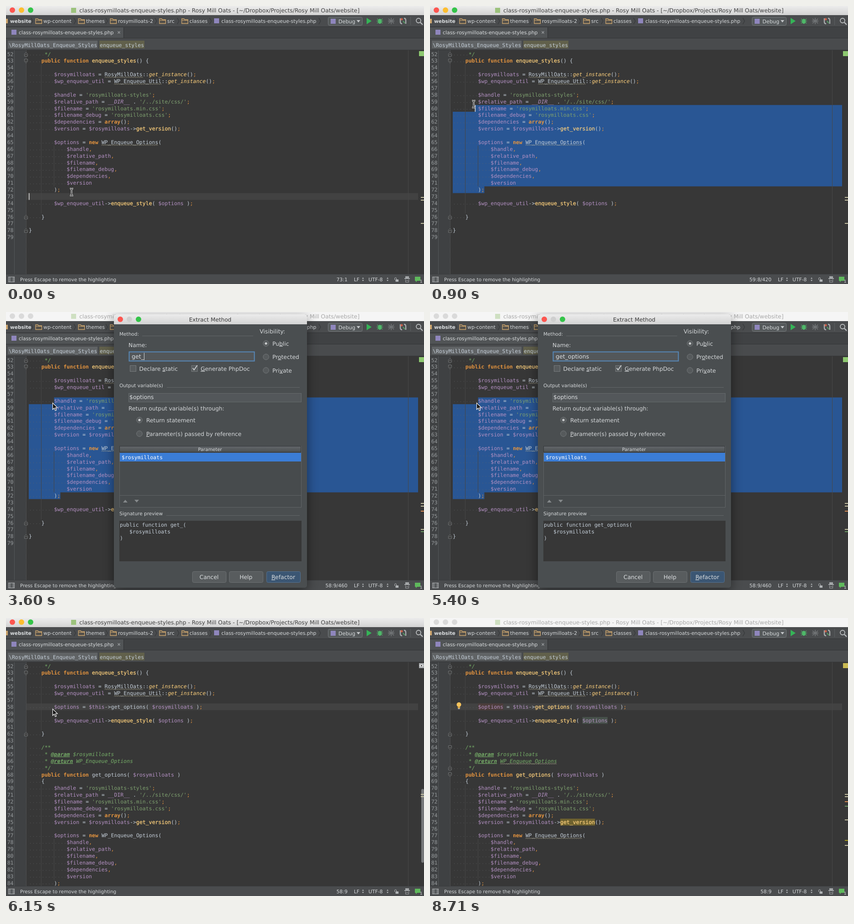
Recreate the animation shown at these times as an HTML page. Size 918 px wide and 610 px high, loop 8.81 s.

```html
<!DOCTYPE html>
<html lang="en">
<head>
<meta charset="utf-8">
<title>Extract Method</title>
<style>
html, body { margin: 0; width: 100%; height: 100%; overflow: hidden; background: #373737; }
svg { position: absolute; left: 0; top: 0; display: block; }
text { font-family: "DejaVu Sans", sans-serif; white-space: pre; text-rendering: geometricPrecision; }
.mono, .mono text { font: 11.53px "DejaVu Sans Mono", monospace; fill: #c3cdd7; }
.mono .key { fill: #e4943f; font-weight: bold; }
.mono .punct { fill: #e4943f; }
.mono .var { fill: #b491c3; }
.mono .str { fill: #7ea06f; }
.mono .fn, .mono .lateFn { fill: #ffd17d; stroke: #ffd17d; stroke-width: .25; }
.mono .static { fill: #ffd17d; font-style: italic; }
.mono .const { fill: #b491c3; font-style: italic; }
.mono .doc { fill: #76ae68; font-style: italic; }
.mono .tag { fill: #76ae68; font-style: italic; font-weight: bold; text-decoration: underline; }
.mono .num { fill: #979b9d; text-anchor: end; }
.mono.fresh .lateFn { fill: #c3cdd7; stroke: none; }
.mono.fresh .const { font-style: normal; }
</style>
</head>
<body>
<svg id="stage" width="918" height="610" viewBox="0 0 918 610"></svg>
<script>
const LOOP = 8810, LEFT = 50, CHAR = 6.941, PITCH = 14.875, FIRST = 52;
const colX = col => LEFT + col * CHAR;
const rowY = line => 98.2 + (line - FIRST) * PITCH;

// Markup helpers
const rect = (x, y, w, h, fill, more = '') =>
  `<rect x="${x}" y="${y}" width="${w}" height="${h}" fill="${fill}" ${more}/>`;
const dot = (x, y, r, fill, more = '') => `<circle cx="${x}" cy="${y}" r="${r}" fill="${fill}" ${more}/>`;
const path = (d, stroke, more = '') => `<path d="${d}" stroke="${stroke}" fill="none" ${more}/>`;
const shape = (d, fill, more = '') => `<path d="${d}" fill="${fill}" ${more}/>`;
const label = (x, y, str, size, fill = '#d5d8da', more = '') =>
  `<text x="${x}" y="${y}" font-size="${size}" fill="${fill}" ${more}>` +
  str.replace(/&(.)/, '<tspan text-decoration="underline">$1</tspan>') + '</text>';
const group = (id, body, more = '') => `<g id="${id}" ${more}>${body}</g>`;
const lights = (y, x, colors) => colors.map((c, i) => dot(x + i * 20, y, 6, c)).join('');

// Source code shown in the editor
const head = [
  '     */', '    public function enqueue_styles() {', '',
  '        $rosymilloats = RosyMillOats::get_instance();',
  '        $wp_enqueue_util = WP_Enqueue_Util::get_instance();', ''];
const body = [
  "        $handle = 'rosymilloats-styles';",
  "        $relative_path = __DIR__ . '/../site/css/';",
  "        $filename = 'rosymilloats.min.css';",
  "        $filename_debug = 'rosymilloats.css';",
  '        $dependencies = array();',
  '        $version = $rosymilloats->get_version();', '',
  '        $options = new WP_Enqueue_Options(',
  ...['$handle,', '$relative_path,', '$filename,', '$filename_debug,', '$dependencies,', '$version']
    .map(arg => ' '.repeat(12) + arg),
  '        );'];
const tail = ['        $wp_enqueue_util->enqueue_style( $options );', '', '    }', ''];
const before = [...head, ...body, '', ...tail, '}', ''];
const after = [...head, '        $options = $this->get_options( $rosymilloats );', '', ...tail,
  '    /**', '     * @param $rosymilloats', '     * @return WP_Enqueue_Options', '     */',
  '    public function get_options( $rosymilloats )', '    {', ...body];

const rules = [
  ['str', /^'[^']*'/], ['var', /^\$\w+/], ['const', /^__DIR__/],
  ['key', /^(public|function|new|array)\b/], ['static', /^get_instance/],
  ['lateFn', /^get_options/], ['fn', /^(enqueue_styles?|get_version)/],
  ['punct', /^[;,]/], ['', /^(\w+|\s+|[^\w\s$';,]+)/]];

function tokens(line) {
  if (/^\s*(\/\*|\*)/.test(line))
    return line.split(/(@\w+)/).map(s => [s[0] === '@' ? 'tag' : 'doc', s]);
  const out = [];
  while (line) {
    const [cls, re] = rules.find(([, r]) => r.test(line));
    const text = line.match(re)[0];
    out.push([cls, text]);
    line = line.slice(text.length);
  }
  return out;
}

function codeLine(line, n) {
  const y = rowY(n) + 11.4, indent = line.search(/\S/);
  let col = 0, spans = '', dots = '';
  for (const [cls, text] of tokens(line)) {
    const pad = text.search(/\S/);
    if (pad >= 0) spans += `<tspan class="${cls}" x="${colX(col + pad)}">${text.slice(pad)}</tspan>`;
    col += text.length;
  }
  for (let i = 0; i < indent; i++) dots += `M${colX(i + .5) - .5} ${y - 2}h1`;
  return (dots && path(dots, '#636567')) + `<text y="${y}">${spans}</text>`;
}
const code = lines => lines.map((s, i) => codeLine(s, FIRST + i)).join('');

function wave(line, col, count) {
  const n = Math.round(count * CHAR / 4);
  return path(`M${colX(col)} ${rowY(line) + 14.4}` + 'l2 -1.8l2 1.8'.repeat(n), '#b3ae94', 'stroke-width=".8"');
}
const guide = (col, from, to) => path(`M${Math.floor(colX(col)) + .5} ${rowY(from)}V${rowY(to)}`, '#464646');
const usage = (lines, line, word, fill) => {
  const col = lines[line - FIRST].lastIndexOf(word);
  return rect(colX(col), rowY(line), word.length * CHAR, 15, fill);
};
const fold = (line, down) => {
  const y = rowY(line) + 3.5;
  const d = down ? `M40.5 ${y}h7v5l-3.5 3.5l-3.5-3.5z` : `M40.5 ${y + 8.5}h7v-5l-3.5-3.5l-3.5 3.5z`;
  return shape(d, '#373737', 'stroke="#7c7f80" stroke-width=".9"') + path(`M42.3 ${y + 4.5}h3.4`, '#8f9293');
};
const mark = (y, color = '#c4c0a0') => rect(911, y - 1, 7, 2, color);
const numbers = (from, to) => {
  let s = '';
  for (let n = from; n <= to; n++) s += `<text class="num" x="16.5" y="${rowY(n) + 11.4}">${n}</text>`;
  return s;
};

// Window chrome
const folder = x => shape(`M${x} 28h5l1.5 2h7v8.5h-13.5z`, '#54504a', 'stroke="#cda66f" stroke-width="1.3"') +
  path(`M${x} 31.5h13.5`, '#cda66f');
const chevron = x => path(`M${x} 26l4 7l-4 7`, '#36383a', 'stroke-width="1.2"');
const chip = (x, y, color = '#8f86bd') => rect(x, y, 11, 11, color);

const fileName = 'class-rosymilloats-enqueue-styles.php';
const titleText = fileName + ' - Rosy Mill Oats - [~/Dropbox/Projects/Rosy Mill Oats/website]';
const titleBar = (id, bar, text, colors, icon) => group(id,
  rect(0, 0, 918, 20, bar) + lights(9, 14, colors) + chip(143, 4, icon) + label(161, 14, titleText, 12.28, text));

const crumbs = [[82, 'wp-content'], [176, 'themes'], [246, 'rosymilloats-2'], [354, 'src'], [403, 'classes']];
const toolbar = rect(0, 20, 918, 26, '#4a4c4e') + rect(0, 45, 918, 1, '#333537') +
  rect(0, 28, 4, 10, '#cda66f') + label(9, 37, 'website', 10.6, '#dadddf', 'font-weight="bold"') +
  crumbs.map(([x, s]) => chevron(x - 27) + folder(x - 17) + label(x, 37, s, 10.95)).join('') +
  chevron(447) + chip(457, 27) + label(473, 37, fileName, 10.9) + chevron(687) +
  rect(707.5, 24.5, 75, 18, '#55595b', 'rx="3" stroke="#75797b"') + chip(713, 28) +
  label(730, 38, 'Debug', 11.3) + shape('M770 31h8l-4 5z', '#c6c9cb') +
  shape('M792 26l11 7l-11 7z', '#35b457') +
  path('M815 28l12 10M815 38l12-10M814 33h14', '#4fa864', 'stroke-width="1.4"') +
  '<ellipse cx="821" cy="33.5" rx="4" ry="5.5" fill="#4fb869"/>' +
  path('M840 28l12 10M840 38l12-10M846 26v14M839 33h14', '#6f7274', 'stroke-width="1.8"') +
  path('M866 27v8q0 4 4 4M874 27q4 0 4 4v8', '#a9acae', 'stroke-width="2.4"') +
  dot(869, 29, 2.5, '#c9624c') + path('M872 33l4 5', '#58a866', 'stroke-width="2"') +
  path('M888.5 24v18', '#5c5f61') +
  dot(906, 32, 5, 'none', 'stroke="#b9bcbe" stroke-width="1.8"') + path('M910 36l5 5', '#b9bcbe', 'stroke-width="2.4"');

const tabs = rect(0, 46, 918, 25, '#404244') + rect(0, 47, 258, 23, '#515456') + rect(258, 47, 1, 23, '#2f3133') +
  chip(12, 52) + label(28, 62, fileName, 10.9, '#dadddf') +
  path('M245.5 55.5l5 5m0-5l-5 5', '#9b9ea0', 'stroke-width="1.2"') + rect(0, 70, 918, 1, '#333537') +
  rect(0, 71, 918, 26, '#494b4d') + rect(4, 76, 197, 17, '#606365') + rect(205, 76, 99, 17, '#61604b') +
  '<g class="mono"><text x="6" y="90">\\RosyMillOats_Enqueue_Styles</text><text x="206" y="90">enqueue_styles</text></g>' +
  rect(0, 96, 918, 1, '#353739');

const updown = x => shape(`M${x} 598.5l2-3l2 3zM${x} 601l2 3l2-3z`, '#b6b9bb');
const statusBar = rect(0, 588, 918, 22, '#4a4c4e') + rect(0, 588, 918, 1, '#3a3c3e') +
  rect(5.5, 594.5, 13, 11, '#585b5d', 'stroke="#b0b3b5"') + path('M8.5 594v12M16 594v12', '#b0b3b5') +
  label(31, 604, 'Press Escape to remove the highlighting', 10.48) +
  label(750, 604, '', 10.8, '#d5d8da', 'id="position" text-anchor="end"') +
  label(764, 604, 'LF', 10.8) + updown(782) + label(796, 604, 'UTF-8', 10.8) + updown(836) +
  rect(855.5, 600, 6.5, 5, '#b0b3b5') + path('M853.5 601v-3q0-2 2-2t2 2v2', '#b0b3b5') +
  rect(877, 593, 8, 4, '#a4a7a9') + rect(875, 597, 12, 2, '#a4a7a9') +
  path('M877.5 600v6h7v-6M879 602.5h4', '#a4a7a9') +
  shape('M898 594h12v9h-7l-3 3v-3h-2z', '#5fb95c') + label(909, 607, '1', 8.5, '#e0e2e3');

// Extract Method dialog
const radio = (x, y, s, on, gap = 14) => dot(x, y, 6.3, '#565a5c', 'stroke="#74787a"') +
  (on ? dot(x, y, 2.6, '#c9cccd') : '') + label(x + gap, y + 4.5, s, 12.3);
const check = (x, y, s, on) => rect(x + .5, y + .5, 13, 13, '#575b5d', 'stroke="#777b7d"') +
  (on ? path(`M${x + 3} ${y + 6}l3 4l7-10`, '#d0d3d4', 'stroke-width="1.8"') : '') + label(x + 20.5, y + 11.5, s, 12.3);
const section = (x, y, s, from, to) => label(x, y, s, 10.5) + path(`M${from} ${y + .5}H${to}`, '#626668');
const button = (x, w, s, fill = '#585c5e', edge = '#6d7173') =>
  rect(x + .5, 569.5, w, 24, fill, `rx="3" stroke="${edge}"`) +
  label(x + w / 2, 586, s, 12.4, '#dcdfe1', 'text-anchor="middle"');

const dialog =
  rect(237, 12, 424, 600, '#000', 'opacity=".45" filter="url(#blur)"') +
  rect(237, 5, 424, 600, '#4a4e50', 'rx="5"') +
  shape('M237 27V10q0-5 5-5h414q5 0 5 5v17z', 'url(#bar)') +
  lights(16, 251, ['#fc5650', '#cfcfcf', '#34c449']) +
  label(448.5, 21, 'Extract Method', 12.2, '#3a3a3a', 'text-anchor="middle"') +
  section(249, 52, 'Method:', 299, 543) + label(557, 47, 'Visibility:', 12.6) +
  radio(571, 69, 'Pu&blic', true) + radio(571, 98.5, 'Pr&otected') + radio(571, 128, 'Pri&vate') +
  label(269, 77, 'Name:', 12.3) +
  rect(270.5, 87.5, 275, 20, '#53575a', 'stroke="#5788b8" stroke-width="2"') +
  label(276, 102, '', 12.6, '#dcdfe1', 'id="name"') + rect(0, 89.5, 1, 16, '#d5d8da', 'id="nameCaret"') +
  check(272, 117, 'Declare &static') + check(407, 117, '&Generate PhpDoc', true) +
  section(249, 165, 'Output variable(s)', 353, 645) +
  rect(269.5, 178.5, 379, 19, '#53575a', 'stroke="#656a6c"') + label(271, 191, '$options', 12.4, '#dcdfe1') +
  label(269, 216, 'Return output variable(s) through:', 12.25) +
  radio(293, 237, 'Return statement', true, 15) + radio(293, 267, '&Parameter(s) passed by reference', false, 15) +
  rect(249.5, 294.5, 399, 134, '#474b4d', 'stroke="#5f6365"') +
  rect(249.5, 294.5, 398, 13, 'url(#header)', 'stroke="#34373a"') +
  label(448, 305, 'Parameter', 10.1, '#d8dbdd', 'text-anchor="middle"') +
  rect(250, 309, 398, 19, '#3b7dd6') + '<text class="mono" x="254" y="323" style="fill:#fff">$rosymilloats</text>' +
  rect(250, 402, 398, 1, '#5f6365') + shape('M257 418l5-6l5 6zM282 412l5 6l5-6z', '#85898b') +
  section(249, 446, 'Signature preview', 352, 645) + rect(249, 458, 400, 89, '#373737') +
  '<g class="mono"><text id="preview" x="250" y="471"></text><text x="271" y="486">$rosymilloats</text><text x="250" y="500">)</text></g>' +
  button(409, 74, 'Cancel') + button(490, 74, 'Help') + button(572, 74, '&Refactor', '#3b5673', '#54718f');

const bulb = dot(63.5, 190, 5, '#f6c35c') + rect(61, 194, 5, 4, '#d9a646') + rect(61.5, 198, 4, 2, '#b5b5b5');

document.getElementById('stage').innerHTML = `
  <defs>
    <linearGradient id="bar" x2="0" y2="1"><stop stop-color="#ececec"/><stop offset="1" stop-color="#d3d3d3"/></linearGradient>
    <linearGradient id="header" x2="0" y2="1"><stop stop-color="#62666a"/><stop offset="1" stop-color="#4c5052"/></linearGradient>
    <filter id="blur" x="-20%" y="-20%" width="140%" height="140%"><feGaussianBlur stdDeviation="12"/></filter>
  </defs>` +
  rect(0, 97, 918, 492, '#373737') + rect(0, 97, 44, 492, '#3f4143') + rect(18, 97, 1, 492, '#54575a') +
  path('M44.5 97V589', '#626466', 'stroke-dasharray="1 1"') +
  rect(LEFT - 5, 0, 860, PITCH, '#424242', 'id="caretRow"') +
  '<path id="selection" fill="#295694"/>' + path('M883.5 97V589', '#474747') +
  group('usages', usage(after, 58, '$options', '#4c3d3b') + usage(after, 60, '$options', '#47514b') +
    usage(after, 75, 'get_version', '#6f622f')) +
  group('numbers', numbers(52, 79) + group('moreNumbers', numbers(80, 84)), 'class="mono"') +
  fold(52) + fold(53, true) + wave(55, 24, 12) + wave(56, 27, 15) +
  group('codeBefore', guide(4, 54, 76) + guide(8, 66, 72) + code(before) + wave(65, 23, 18) + fold(76) + fold(78), 'class="mono"') +
  group('codeAfter', guide(4, 54, 62) + guide(4, 70, 85) + guide(8, 78, 84) + code(after) + fold(62), 'class="mono"') +
  group('analysed', wave(66, 15, 18) + wave(77, 23, 18) + fold(64, true) + fold(67) + fold(68, true)) +
  group('bulb', bulb) +
  rect(907, 99, 11, 11, '#8dc86f', 'id="health"') +
  group('eye', rect(907, 99, 11, 11, '#a9acae') + '<ellipse cx="912.5" cy="104.5" rx="4" ry="2.8" fill="#e8e8e8"/>' + dot(912.5, 104.5, 1.6, '#444')) +
  group('marksBefore', mark(420) + mark(426) + mark(477)) +
  group('marksUsage', mark(437, '#d98c55') + mark(482, '#6b9a63')) +
  rect(912, 375, 6, 162, '#76787a', 'id="scroll" rx="3"') +
  group('marksNew', mark(387) + mark(392)) +
  group('marksAfter', mark(403, '#d98c55') + mark(413, '#6b9a63') + mark(443) + mark(488, '#a89d1c') + mark(499)) +
  rect(0, 0, 1.5, PITCH, '#e0e0e0', 'id="caret"') +
  titleBar('active', 'url(#bar)', '#414141', ['#fc5650', '#fdbe30', '#34c449'], '#9cc27c') +
  titleBar('inactive', '#f5f5f5', '#a9a9a9', ['#dadada', '#dadada', '#dadada'], '#cfe0c2') +
  toolbar + tabs + statusBar +
  group('ibeam', ['#fff', '#111'].map((c, i) =>
    path('M-3.5-7.5q3.5 0 3.5 3V5q0 3-3.5 3M3.5-7.5q-3.5 0-3.5 3M3.5 8q-3.5 0-3.5-3M-2 3h4', c, `stroke-width="${3 - 1.8 * i}"`)).join('')) +
  group('arrow', shape('M0 0V14.5L3.4 11.3L5.8 17L8.2 16L5.8 10.5H10.5Z', '#111', 'stroke="#fff" stroke-width="1.1"')) +
  group('dialog', dialog);

// Timelines: the last entry whose time has passed applies
const pointer = [
  [0, 'ibeam', 144, 408], [300, 'ibeam', 122, 405], [450, 'ibeam', 119, 390], [600, 'ibeam', 112, 345],
  [750, 'ibeam', 102, 272], [900, 'ibeam', 96, 215], [1050, 'ibeam', 97, 203], [1200, 'ibeam', 100, 195],
  [1500, 'ibeam', 106, 198], [1650, 'arrow', 102.5, 199.5], [7500, 'ibeam', 110, 195],
  [7800, 'ibeam', 190, 238], [7950, 'ibeam', 520, 408], [8100, 'ibeam', 892, 581], [8250, 'none', 0, 0]];
// time, drawn line and column, reported line
const carets = [
  [0, 73, 0, 73], [300, 72, 10, 72], [450, 71, 10, 71], [600, 68, 9, 67], [750, 63, 8, 62],
  [900, 60, 7, 59], [1050, 59, 7, 58], [1200, 58, 7, 58], [1500, 58, 8, 58]];
// time, letters of the name
const typed = [
  [0, 0], [3150, 2], [3300, 3], [3600, 4], [3750, 5], [3900, 6], [4050, 7],
  [4350, 8], [4500, 9], [4650, 10], [4950, 11]];
const END = { line: 72, col: 10 };

const at = (track, t) => track.filter(step => step[0] <= t).pop();
const $ = id => document.getElementById(id);
const show = (id, on) => { $(id).style.display = on ? '' : 'none'; };
const set = (id, text) => { if ($(id).textContent !== text) $(id).textContent = text; };

function selectedCount(line, col) {
  if (line === END.line) return END.col - col;
  const rows = before.slice(line - FIRST, END.line - FIRST);
  return rows.reduce((sum, s) => sum + s.length + 1, 0) - col + END.col;
}

function selectionPath(line, col) {
  const top = rowY(line), last = rowY(END.line);
  return `M${colX(col)} ${top}H905V${last}H${colX(END.col)}V${last + PITCH}H${LEFT}V${top + PITCH}H${colX(col)}z`;
}

function draw(t) {
  const extracted = t >= 6150, open = t >= 2550 && t < 6000, done = t >= 6600;
  const [, line, col, reported] = at(carets, t);
  const selecting = t >= 450 && !extracted;
  const inactive = open || t >= 8710;

  show('active', !inactive);
  show('inactive', inactive);
  show('codeBefore', !extracted);
  show('codeAfter', extracted);
  show('moreNumbers', extracted);
  $('codeAfter').classList.toggle('fresh', t < 6300);

  show('caretRow', !selecting);
  $('caretRow').setAttribute('y', rowY(line));
  show('selection', selecting);
  if (selecting) $('selection').setAttribute('d', selectionPath(line, col));
  show('caret', !extracted && !open);
  $('caret').setAttribute('x', colX(col));
  $('caret').setAttribute('y', rowY(line));
  set('position', `${reported}:${col + 1}` + (selecting ? '/' + selectedCount(reported, col) : ''));

  show('marksBefore', !extracted);
  show('marksUsage', t >= 2400 && !extracted);
  show('marksNew', extracted);
  show('marksAfter', done);
  show('analysed', done);
  show('usages', t >= 6900);
  show('bulb', t >= 7050);
  show('eye', extracted && !done);
  $('health').setAttribute('fill', done ? '#c9b952' : '#8dc86f');
  show('scroll', extracted && t < 7350);
  $('scroll').style.opacity = Math.min(1, Math.max(0, (7350 - t) / 600));

  const [, kind, x, y] = at(pointer, t);
  for (const id of ['ibeam', 'arrow']) show(id, id === kind);
  if (kind !== 'none') $(kind).setAttribute('transform', `translate(${x} ${y})`);

  show('dialog', open);
  if (open) {
    const name = 'get_options'.slice(0, at(typed, t)[1]);
    set('name', name);
    set('preview', `public function ${name}(`);
    show('nameCaret', t >= 2700 && t < 5400);
    $('nameCaret').setAttribute('x', 276 + (name ? $('name').getComputedTextLength() : 0));
  }
}

const start = performance.now();
function tick() {
  draw((performance.now() - start) % LOOP);
  requestAnimationFrame(tick);
}
tick();
</script>
</body>
</html>
```
